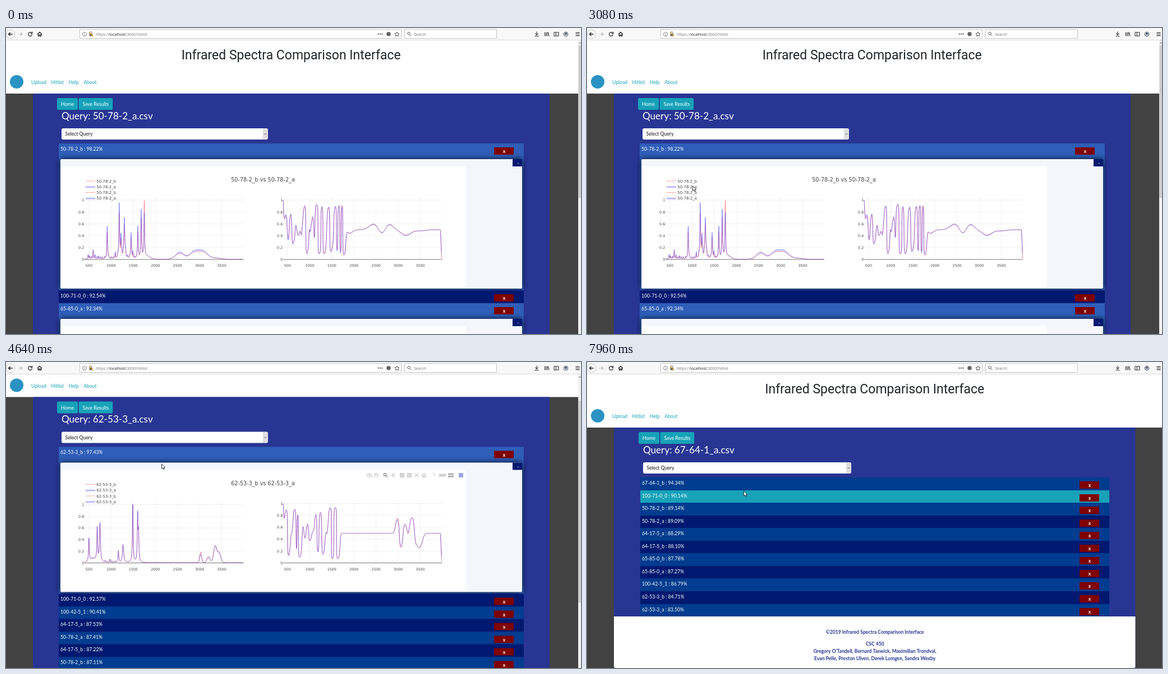
Write an HTML page with a canvas that moves like this. It is 1025 by 546 pixels and loops after 8 s.

```html
<!DOCTYPE html>
<html lang="en">
<head>
<meta charset="utf-8">
<title>Infrared Spectra Comparison Interface</title>
<style>
html, body { margin: 0; width: 100%; height: 100%; overflow: hidden; background: #fff; }
canvas { display: block; width: 100vw; height: 100vh; }
</style>
</head>
<body>
<canvas id="stage" width="1025" height="546"></canvas>
<script>
const ctx = document.getElementById('stage').getContext('2d');
const LOOP = 8000, W = 1025, H = 546, LIST_TOP = 206, ROW_H = 22.55, CARD_H = 231;
const LATO = 'Lato, sans-serif', OPEN = '"Open Sans", sans-serif', DEJAVU = '"DejaVu Sans", sans-serif';
const TEAL = '#17a2b8', NAVY = '#001970', BLUE = '#003c8f', ACTIVE = '#2e5eb8', INDIGO = '#283593';
const AXIS_Y = 413, LEFT_X = 140, RIGHT_X = 494, AXIS_W = 283;

const random = i => { const v = Math.sin(i * 12.9898) * 43758.5453; return v - Math.floor(v); };
const smooth = u => { u = Math.max(0, Math.min(1, u)); return u * u * (3 - 2 * u); };
const within = (t, a, b) => t >= a && t < b;

// Seeded small peaks fill a range; key peaks are [centre, height, width, red factor].
function makeSpectrum({ unit, fuzz: [from, to, size], peaks, red }) {
  const all = peaks.map(([c, h, w = .75, factor = red]) => ({ c, h, w, factor }));
  for (let c = from, i = 1; c < to; c += 2.2 + 2.4 * random(i), i++)
    all.push({ c, h: size * (.15 + random(i + 50) ** 2) * smooth((c - from + 12) / 35), w: .55, factor: red });
  const height = (p, isRed) => p.h * (isRed ? p.factor : 1);

  const absorbance = (x, isRed) => all.reduce((sum, p) => {
    const u = ((x - p.c) / p.w) ** 2;
    return sum + height(p, isRed) * (p.w > 1.5 ? Math.exp(-u) : 1 / (1 + u));
  }, .003);

  // The right chart is the compressed slope of the smoothed left one.
  const slope = (x, isRed) => {
    const lx = x - RIGHT_X + LEFT_X;
    const s = all.reduce((sum, p) => {
      const w = p.w + 2, d = lx - p.c;
      return sum - 2 * height(p, isRed) * d / (w * w) * Math.exp(-d * d / (w * w));
    }, 0);
    const value = .5 + .47 * s / (Math.abs(s) + .03) + .5 * Math.exp((RIGHT_X - x) / 1.5);
    const drop = smooth((x - 774) / 3) * (isRed ? .5 : .4);
    return Math.max(0, Math.min(1, value - drop));
  };
  return { unit, traces: [buildTrace(absorbance, LEFT_X, unit), buildTrace(slope, RIGHT_X, 106)] };
}

function buildTrace(valueAt, x0, unit) {
  const sample = isRed => Array.from({ length: AXIS_W * 4 }, (_, i) => {
    const x = x0 + i / 4;
    return [x, AXIS_Y - unit * valueAt(x, isRed)];
  });
  const path = pts => new Path2D('M' + pts.join('L'));
  const red = sample(true), blue = sample(false);
  return { red: path(red), blue: path(blue), band: path([...red, ...blue.reverse()]) };
}

const aspirin = makeSpectrum({
  unit: 106, red: .82, fuzz: [142, 232, .22],
  peaks: [[180.5, .42], [201.8, .9], [205, .36], [211, .68, 1], [223, .42], [235, .54], [241, .82], [246.5, .74, .7, 1.28],
    [252, .05, 7], [310, .12, 11], [334, .11, 10], [350, .15, 13], [376, .02, 12]]
});
const aniline = makeSpectrum({
  unit: 104, red: .98, fuzz: [172, 222, .08],
  peaks: [[147.8, .39], [155, .06, 9, 1.2], [162.6, .58], [167.5, .67, 1], [200.3, .2], [208.5, .3, 1.1], [226, 1],
    [234.7, .8], [236.3, .46], [347, .14, 2.5, 1.3], [361, .09, 4, 1.2], [373, .28, 4, 1.04], [380, .16, 4, 1.1]]
});

const parse = list => list.map(s => s.split(' '));
const pages = {
  a: { query: '50-78-2_a', spectrum: aspirin, open: [0, 2], thumb: 272,
    rows: parse(['50-78-2_b 98.22', '100-71-0_0 92.54', '65-85-0_a 92.34']) },
  b: { query: '62-53-3_a', spectrum: aniline, open: [0], thumb: 360,
    rows: parse(['62-53-3_b 97.43', '100-71-0_0 92.57', '100-42-5_1 90.41', '64-17-5_a 87.53', '50-78-2_a 87.41',
      '64-17-5_b 87.22', '50-78-2_b 87.11', '65-85-0_b 86.35', '65-85-0_a 86.02', '67-64-1_a 84.71', '67-64-1_b 84.36']) },
  c: { query: '67-64-1_a', open: [],
    rows: parse(['67-64-1_b 94.34', '100-71-0_0 90.14', '50-78-2_b 89.14', '50-78-2_a 89.09', '64-17-5_a 88.29',
      '64-17-5_b 88.10', '65-85-0_b 87.78', '65-85-0_a 87.27', '100-42-5_1 86.79', '62-53-3_b 84.71', '62-53-3_a 83.50']) }
};
pages.bClosed = { ...pages.b, open: [] };
const compounds = ['50-78-2', '62-53-3', '64-17-5', '65-85-0', '67-64-1'];
const options = ['Select Query', ...compounds.flatMap(c => [`${c}_a.csv`, `${c}_b.csv`]), '100-42-5_1.csv', '100-71-0_0.csv'];

// Cursor moves: [start, end, x, y]
const moves = [[70, 840, 211, 185], [1460, 2000, 151, 254], [2780, 3080, 188, 281.5], [3080, 3600, 282, 225.5],
  [4250, 4640, 277, 181.5], [4640, 5100, 205, 138], [5560, 6250, 165, 295], [7020, 7270, 289, 315], [7570, 7960, 279, 230]];

function cursorAt(t) {
  let x = 973, y = 538;
  for (const [start, end, toX, toY] of moves) {
    const e = smooth((t - start) / (end - start));
    x += (toX - x) * e;
    y += (toY - y) * e;
  }
  return [x, y];
}

function rect(x, y, w, h, color, radius = 0) {
  ctx.fillStyle = color;
  ctx.beginPath();
  ctx.roundRect(x, y, w, h, radius);
  ctx.fill();
}
function text(str, x, y, size, color, family = LATO, align = 'left', weight = 400) {
  ctx.font = `${weight} ${size}px ${family}`;
  ctx.fillStyle = color;
  ctx.textAlign = align;
  ctx.fillText(str, x, y);
}
function disc(x, y, r, color) {
  ctx.fillStyle = color;
  ctx.beginPath();
  ctx.arc(x, y, r, 0, 7);
  ctx.fill();
}
function icon(x, y, path, color = '#333', width = 1.1, fill) {
  ctx.save();
  ctx.translate(x, y);
  const p = new Path2D(path);
  if (fill) { ctx.fillStyle = fill; ctx.fill(p); }
  ctx.strokeStyle = color;
  ctx.lineWidth = width;
  ctx.stroke(p);
  ctx.restore();
}
const circlePath = r => `M${-r} 0A${r} ${r} 0 1 1 ${r} 0A${r} ${r} 0 1 1 ${-r} 0Z`;
const MAGNIFIER = 'M-3.2-1A2.3 2.3 0 1 1 1.4-1A2.3 2.3 0 1 1-3.2-1M.8 .8L3.6 3.6';
const HOME = 'M-4 .2L0-3.6L4 .2M-2.6-.6V3.4H-.8V1H.8V3.4H2.6V-.6';

function toolbar() {
  rect(0, 0, W, 22, '#f8f8f9');
  rect(0, 21, W, 1, '#dcdcdc');
  icon(8, 11, circlePath(7.8), '#b5b5b5', .8, '#fff');
  icon(8, 11, 'M3.7 0H-3.5M-.3-3.2L-3.5 0L-.3 3.2', '#222', 1.3);
  icon(25.5, 11, 'M-3.7 0H3.5M.3-3.2L3.5 0L.3 3.2', '#b8b8b8', 1.2);
  icon(43, 11, 'M2.5-2.3A3.4 3.4 0 1 0 3.4 .6M3.6-4.2V-1.2H.6', '#222', 1.2);
  icon(60, 11, HOME, '#222', 1.2);
  for (const [x, w] of [[131.5, 573], [710.5, 164]])
    icon(x, 2.5, `M0 0H${w}V16H0Z`, '#c4c4c4', 1, '#fff');
  icon(140, 11, circlePath(3.6) + 'M0-.4V2.2M0-2.2V-1.3', '#666', .8);
  rect(148.5, 10, 5.5, 4.5, '#666');
  icon(151.2, 9.5, 'M-1.8 1V-1A1.8 1.8 0 0 1 1.8-1V1', '#666', 1);
  icon(151.5, 11, 'M-3.5-3.5L4 4', '#e8a21c', 1.4);
  let x = 160;
  for (const [part, color] of [['https://', '#777'], ['localhost', '#222'], [':3000/hitlist', '#777']]) {
    text(part, x, 13.6, 7.04, color, OPEN);
    x += ctx.measureText(part).width;
  }
  for (const dx of [-3.5, 0, 3.5]) disc(667 + dx, 10.8, 1.1, '#444');
  disc(682, 10.8, 3.8, '#666');
  icon(697, 11, 'M0-4L1.2-1.3L4-1L1.9 1L2.5 3.8L0 2.4L-2.5 3.8L-1.9 1L-4-1L-1.2-1.3Z', '#444', .9);
  icon(719, 10.8, MAGNIFIER, '#555', 1);
  text('Search', 727, 13.6, 7, '#777', OPEN);
  icon(946, 10.5, 'M0-4V1.8M-2.7-.8L0 2L2.7-.8M-3.6 4H3.6');
  icon(964, 11, 'M-3.5-3.5V3.5M-1.2-3.5V3.5M1-3.5V3.5M2.2-3.5L4.2 3.5');
  icon(981, 11, 'M-4-3.2H4V3.2H-4ZM-.6-3.2V3.2');
  icon(998, 11, circlePath(3.8), '#444', .9, '#cfd8ea');
  disc(998, 10.2, 1.7, '#345');
  icon(1019, 11, 'M-3.6-2.6H3.6M-3.6 0H3.6M-3.6 2.6H3.6');
}

function axes(x0, unit) {
  for (let i = 1; i <= 7; i++) {
    const x = x0 + 39.45 * (i - .8);
    rect(x - .4, 302, .8, AXIS_Y - 302, '#eee');
    text(500 * i, x, 426.3, 6.35, '#444', DEJAVU, 'center');
  }
  for (let i = 0; i <= 5; i++) {
    const y = AXIS_Y - unit * i / 5;
    rect(x0, y - .4, AXIS_W, .8, i ? '#eee' : '#777');
    text(i / 5, x0 - .8, y + 2.3, 6.35, '#444', DEJAVU, 'right');
  }
}

function drawTrace({ red, blue, band }) {
  ctx.fillStyle = 'rgba(110,110,255,.25)';
  ctx.fill(band);
  ctx.lineWidth = .85;
  for (const [path, color] of [[red, 'rgba(255,50,60,.62)'], [blue, 'rgba(60,60,255,.62)']]) {
    ctx.strokeStyle = color;
    ctx.stroke(path);
  }
}

function charts({ spectrum, query, rows: [[hit]] }) {
  axes(LEFT_X, spectrum.unit);
  axes(RIGHT_X, 106);
  spectrum.traces.forEach(drawTrace);
  text(`${hit} vs ${query}`, 458, 274.2, 9.65, '#444', DEJAVU, 'center');
  [hit, query, hit, query].forEach((name, i) => {
    const y = 273 + i * 10.25;
    if (i % 2) rect(142, y, 17, 2.5, '#dcdcff');
    rect(142, y - .5, 17, 1, i % 2 ? '#8080ff' : '#ffa0a0');
    text(name, 161.3, y + 2.5, 6.9, '#444', DEJAVU);
  });
}

function modebar() {
  const soft = '#cfcfcf', y = 256.5;
  const box = 'M-3-3H3V3H-3Z';
  icon(648, y, 'M-4-2H-2L-1-3.5H1L2-2H4V3H-4Z' + circlePath(1.4), soft, 1.2);
  icon(660, y, 'M-3-3H2L3-2V3H-3ZM-1.5-3V-.5H1.5V-3', soft, 1.2);
  icon(676.5, y, MAGNIFIER, '#8c8c8c', 1.4);
  icon(690, y, 'M-4 0H4M0-4V4', soft, 1.5);
  icon(706, y, box + 'M-2 0H2M0-2V2', soft, 2);
  icon(719, y, box + 'M-2 0H2', soft, 2);
  icon(732, y, 'M-3.5-3.5L3.5 3.5M3.5-3.5L-3.5 3.5', soft, 1.4);
  icon(745, y, HOME, soft, 1.4);
  icon(762, y, 'M-2-3H2V2', soft, 1);
  rect(772, y - 2.5, 12, 5, soft);
  icon(793, y, 'M-5-2H5M-5 2.2H5', '#b0b0b0', 3);
  rect(807, y - 4, 8, 8, '#9aa8e8');
}

function card(right, top) {
  ctx.save();
  ctx.shadowColor = 'rgba(0,0,10,.95)';
  ctx.shadowBlur = 10;
  rect(97, top, right - 100, CARD_H, '#f4f6fc', 2);
  ctx.restore();
  rect(97, top + 13, 723, 215, '#fff');
  rect(right - 20, top, 17, 13, NAVY);
  text('–', right - 10, top + 10, 7, '#fff', LATO, 'center', 700);
}

function hitRows(page, left, right, cursorY, t) {
  let top = LIST_TOP;
  page.rows.forEach(([name, score], i) => {
    const open = page.open.includes(i), y = Math.round(top);
    top += open ? CARD_H + 31 : ROW_H;
    const height = Math.round(top) - y;
    const hovered = !page.open.length && within(cursorY, y, y + height);
    rect(left, y, right - left, height, open ? ACTIVE : hovered ? TEAL : i % 2 ? NAVY : BLUE);
    if (open) card(right, y + 28);
    if (open && i === 0) {
      charts(page);
      if (within(t, 4400, 4800)) modebar();
    }
    text(`${name} : ${score}%`, left + 3, y + 12.6, 8.6, '#fff');
    rect(right - 53, y + 7, 35, 13, '#7f0000');
    text('x', right - 35, y + 17.3, 8.6, '#fff', LATO, 'center', 700);
  });
  return Math.round(top);
}

function dropdown(cursorY) {
  const top = 199, step = 209 / options.length;
  const active = Math.max(0, Math.floor((cursorY - top) / step));
  rect(99, top, 369, 209, '#b8b8b8');
  rect(99.5, top + .5, 368, 208, '#fff');
  options.forEach((label, i) => {
    if (i === active) rect(99.5, top + i * step, 368, step, '#0078d7');
    text(label, 105.5, top + i * step + 11.2, 8.6, i === active ? '#fff' : '#222');
  });
}

function footer(top) {
  rect(48, top, 929.5, H - top, '#fff', [0, 0, 3, 3]);
  const lines = ['CSC 450', 'Gregory O’Tandell, Bernard Taswick, Maximilian Trondval,',
    'Evan Pelle, Preston Ulven, Derek Lumgen, Sandra Wexby'];
  text('©2019 Infrared Spectra Comparison Interface', 513.2, 485, 8.6, INDIGO, LATO, 'center', 700);
  lines.forEach((line, i) => text(line, 513.2, 506.2 + i * 12.9, 8.6, INDIGO, LATO, 'center', 700));
}

function scrollbar(page, scroll) {
  rect(1020, 22, 5, H - 22, '#f0f0f0');
  icon(1023, 27, 'M-2 1L0-1L2 1', '#666', 1);
  rect(1020.5, 31 + scroll * .7, 4.5, page.thumb, '#cdcdcd');
}

function drawPage(page, t, scroll, cursorY) {
  const wide = !page.open.length, dx = wide ? 1 : 0;
  const left = 94 + dx, right = wide ? 931 : 923, selectRight = wide ? 471 : 467;
  ctx.save();
  ctx.beginPath();
  ctx.rect(0, 22, W, H);
  ctx.clip();
  rect(0, 0, W, H, '#424242');
  ctx.translate(0, -scroll);
  rect(0, 0, W, 117, '#fff');
  text('Infrared Spectra Comparison Interface', wide ? 512.7 : 508.2, 56.2, 23, '#212529', 'Roboto, sans-serif', 'center');
  disc(19, 96, 12, '#2a93c4');
  let navX = 45;
  for (const label of ['Upload', 'Hitlist', 'Help', 'About']) {
    text(label, navX, 100, 8.6, TEAL);
    navX += ctx.measureText(label).width + 8.6;
  }
  rect(48, 117, wide ? 929.5 : 921, 600, INDIGO);
  rect(91 + dx, 125, 37, 21, TEAL, 2);
  rect(129.5 + dx, 125, 60.7, 21, TEAL, 2);
  text('Home', 109.5 + dx, 139, 8.6, '#fff', LATO, 'center');
  text('Save Results', 159.9 + dx, 139, 8.6, '#fff', LATO, 'center');
  text(`Query: ${page.query}.csv`, 99 + dx, 162.8, 17.1, '#fff');
  rect(99 + dx, 179, selectRight - 99 - dx, 20, '#fff', 3);
  rect(selectRight - 9, 179.5, 8.7, 19, '#dedede', [0, 3, 3, 0]);
  icon(selectRight - 4.6, 189.2, 'M-1.9-1L0 1L1.9-1', '#444', .9);
  text('Select Query', 105.5 + dx, 192.2, 8.6, '#111');
  const end = hitRows(page, left, right, cursorY + scroll, t);
  if (wide) footer(end);
  if (within(t, 1070, 2300) || within(t, 5250, 6560)) dropdown(cursorY + scroll);
  ctx.restore();
  if (!wide) scrollbar(page, scroll);
}

function drawCursor(t, x, y) {
  if (t < 70) return;
  if (within(t, 1000, 1150) || within(t, 5170, 5330)) disc(x + .5, y + .8, 6.3, 'rgba(255,226,20,.85)');
  icon(x + .5, y + .3, 'M0 0V8.8L2.1 6.9L3.5 10L4.8 9.4L3.5 6.4H6.2Z', '#111', .8, '#fff');
}

function frame(now) {
  const t = now % LOOP, [x, y] = cursorAt(t);
  const page = t < 3240 ? pages.a : t < 3860 ? pages.bClosed : t < 7420 ? pages.b : pages.c;
  const scroll = t < 7420 ? 54.5 * smooth((t - 4230) / 290) : 0;
  drawPage(page, t, scroll, y);
  toolbar();
  drawCursor(t, x, y);
  requestAnimationFrame(frame);
}
requestAnimationFrame(frame);
</script>
</body>
</html>
```
